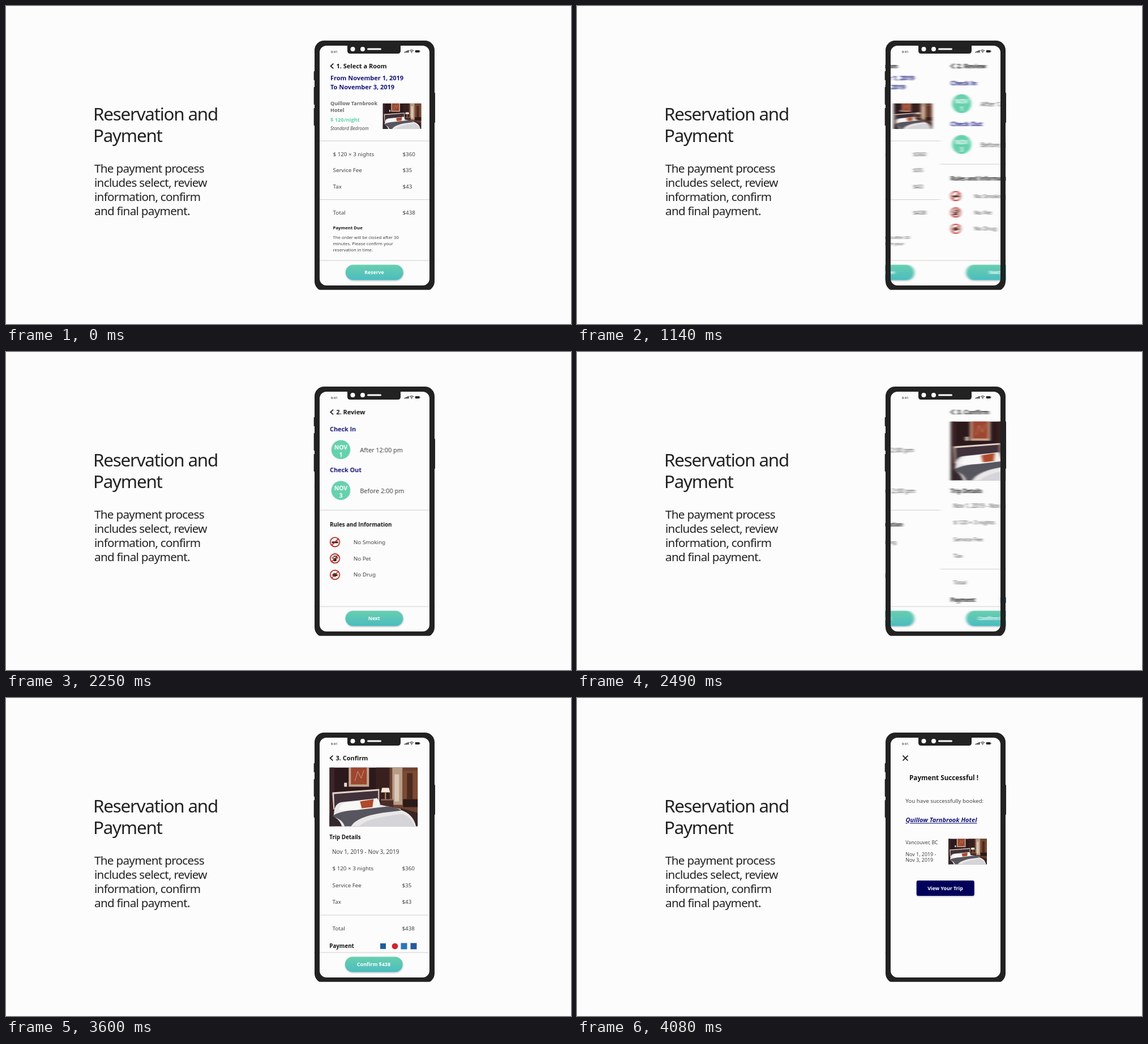
An HTML page for the animation above (5400 ms loop, 998x561 px).

```html
<!DOCTYPE html>
<html lang="en">
<head>
<meta charset="utf-8">
<title>Reservation and Payment</title>
<style>
  html, body { margin: 0; width: 100%; height: 100%; overflow: hidden; background: #fcfcfc; }
  svg { display: block; width: 100%; height: 100%; }
  text { font-family: "Noto Sans", "Open Sans", sans-serif; fill: #444; white-space: pre; }
  .b { font-family: "Open Sans", "Noto Sans", sans-serif; font-weight: 700; }
  .i { font-family: "Open Sans", "Noto Sans", sans-serif; font-style: italic; }
  .dark { fill: #151515; }
  .navy { fill: #14147a; }
  .grey { fill: #666; }
  .mint { fill: #62d0ab; }
  .white { fill: #fff; }
  .title { fill: #222; letter-spacing: -.04em; }
  .intro { fill: #222; letter-spacing: -.035em; }
  .mid { text-anchor: middle; }
  .link { text-decoration: underline; }
  .rule { stroke: #cdcdcd; stroke-width: 1.2; }
  .stroke { fill: none; stroke: #151515; stroke-width: 1.7; }
</style>
</head>
<body>
<svg id="stage" viewBox="0 0 998 561" xmlns="http://www.w3.org/2000/svg"></svg>
<script>
const LOOP = 5400, STEP = 30, SLIDE = 470, PITCH = 194, SHUTTER = 15;
const slideStarts = [890, 2240, 3580];

// y is the middle of the capitals
const text = (x, y, size, str, cls = '') =>
  `<text x="${x}" y="${y + size * .357}" font-size="${size}" class="${cls}">${str}</text>`;
const lines = (x, y, gap, size, rows, cls) =>
  rows.map((row, i) => text(x, y + i * gap, size, row, cls)).join('');
const rect = (x, y, w, h, fill, rx = 0, extra = '') =>
  `<rect x="${x}" y="${y}" width="${w}" height="${h}" rx="${rx}" fill="${fill}" ${extra}/>`;
const circle = (x, y, r, fill) => `<circle cx="${x}" cy="${y}" r="${r}" fill="${fill}"/>`;
const path = (d, fill, extra = '') => `<path d="${d}" fill="${fill}" ${extra}/>`;
const rule = y => `<path class="rule" d="M554 ${y}h194"/>`;
const photo = (x, y, w, h) =>
  `<use href="#bedroom" x="${x}" y="${y}" width="${w}" height="${h}"/>`;
const price = (y, label, amount) => text(577.5, y, 9.8, label) + text(700.5, y, 9.8, amount);
const header = label =>
  '<path class="stroke" d="M578.3 101.7l-4.8 4.3 4.8 4.3"/>' + text(583.5, 106, 11, label, 'b dark');
const button = (y, label, size, fill, rx) =>
  rect(599.7, y, 102, 27, fill, rx, 'filter="url(#shadow)"') +
  text(650.5, y + 13.5, size, label, 'b white mid');
const footer = (label, size) => rule(449) + button(456.5, label, size, 'url(#teal)', 13.5);

const dateBadge = (y, day) => circle(591.7, y, 16.8, '#66d1ad') +
  text(591.7, y - 4.2, 10.4, 'NOV', 'b white mid') + text(591.7, y + 8.7, 10.4, day, 'b white mid');

const ban = (y, label, glyph) => `<g transform="translate(581.3 ${y})">${glyph}
  <circle r="8.2" fill="none" stroke="#b9261d" stroke-width="1.8"/>
  <path d="M-5.8 5.8L5.8-5.8" stroke="#b9261d" stroke-width="1.6"/></g>` + text(614, y, 9.8, label);

const cigarette = rect(-5.5, -1, 11, 3, '#2a2020') + path('M2-2q3 0 3-3', 'none', 'stroke="#2a2020"');
const paw = [[-3.6, -1], [-1.4, -4], [1.6, -4], [3.8, -1]]
  .map(([x, y]) => circle(x, y, 1.3, '#2a2020')).join('') + circle(0, 2.2, 2.9, '#2a2020');
const leaf = [-70, -35, 0, 35, 70].map(angle =>
  `<ellipse cy="-2" rx="1.2" ry="3.6" fill="#2a2020" transform="translate(0 2) rotate(${angle})"/>`).join('');

const screens = [
  header('1. Select a Room') +
  lines(573, 127.5, 15.5, 11, ['From November 1, 2019', 'To November 3, 2019'], 'b navy') +
  lines(573, 172, 12.2, 9, ['Quillow Tarnbrook', 'Hotel'], 'b grey') +
  text(573, 201, 9.3, '$ 120/night', 'b mint') +
  text(573, 216.3, 8.1, 'Standard Bedroom', 'i') +
  photo(665.5, 171.7, 68, 45.3) + rule(238) +
  price(261.5, '$ 120 × 3 nights', '$360') + price(290, 'Service Fee', '$35') + price(318.6, 'Tax', '$43') +
  rule(341.5) + price(364.6, 'Total', '$438') +
  text(577.5, 391.5, 7.8, 'Payment Due', 'b dark') +
  lines(577.5, 408, 11, 7.75, ['The order will be closed after 30', 'minutes. Please confirm your', 'reservation in time.']) +
  footer('Reserve', 8.7),

  header('2. Review') +
  text(572.3, 136.3, 10.8, 'Check In', 'b navy') + dateBadge(172.3, '1') + text(625.5, 172.7, 10.9, 'After 12:00 pm') +
  text(572.3, 208.5, 10.8, 'Check Out', 'b navy') + dateBadge(244.2, '3') + text(625.5, 244.8, 10.9, 'Before 2:00 pm') +
  rule(279) + text(572.3, 304.3, 9.8, 'Rules and Information', 'b dark') +
  ban(335.3, 'No Smoking', cigarette) + ban(364.2, 'No Pet', paw) + ban(393, 'No Drug', leaf) +
  footer('Next', 8.7),

  header('3. Confirm') + photo(572.3, 122.5, 156, 104) +
  text(572.3, 245.7, 9.8, 'Trip Details', 'b dark') + text(577, 271.3, 10, 'Nov 1, 2019 - Nov 3, 2019') +
  price(301, '$ 120 × 3 nights', '$360') + price(330.5, 'Service Fee', '$35') + price(360, 'Tax', '$43') +
  rule(383) + price(406.5, 'Total', '$438') +
  text(572.3, 437.7, 9.75, 'Payment', 'b dark') +
  rect(662, 432.8, 10, 10, '#1f5c9e') + circle(688, 437.8, 5.4, '#d5232b') +
  rect(698.5, 432.3, 11, 11, '#2a77b8') + rect(715.5, 432.3, 11, 11, '#275a9c') +
  footer('Confirm $438', 9),

  '<path class="stroke" d="M575.5 101.7l9 8.8m0-8.8l-9 8.8"/>' +
  text(587, 141, 11.7, 'Payment Successful !', 'b dark') +
  text(580.3, 181.5, 9.75, 'You have successfully booked:') +
  text(580.5, 215.5, 11, 'Quillow Tarnbrook Hotel', 'b i navy link') +
  text(580.3, 255, 8.7, 'Vancouver, BC') +
  lines(580.3, 275.7, 10.5, 8.9, ['Nov 1, 2019 -', 'Nov 3, 2019']) +
  photo(656, 248.3, 68, 45.3) + button(322, 'View Your Trip', 8.8, '#05055a', 3)
];

const bedroom = `<symbol id="bedroom" viewBox="0 0 156 104" preserveAspectRatio="none">` +
  rect(0, 0, 156, 104, '#2c191c') +
  rect(0, 0, 9, 104, '#3b2528') + rect(82, 0, 24, 60, '#38201f') +
  rect(34, 0, 36, 34, '#c5a48e') + rect(38, 0, 28, 30, '#9d4630') +
  path('M45 24l5-17 6 12 5-14', 'none', 'stroke="#d29b80" stroke-width="1"') +
  rect(106, 0, 50, 80, '#6b4030') + rect(111, 0, 18, 66, '#b79c87') + rect(115, 12, 8, 48, '#d9c7b3') +
  rect(129, 6, 27, 64, '#7b4a32') + rect(137, 10, 10, 46, '#4c2a20') + rect(130, 56, 26, 14, '#2a1b1a') +
  path('M5 44L88 38V74H7Z', '#e2d3c6') + path('M8 47L86 41V76H9Z', '#40313a') +
  rect(26, 27, 5, 7, '#e8ddd0') + path('M93 36h12l2 8H91Z', '#f5ead8') + rect(98, 44, 2, 14, '#b3937b') +
  rect(91, 57, 22, 22, '#4a2c25') + rect(91, 56, 22, 2, '#957463') +
  path('M8 80Q9 62 24 61L80 55Q89 56 90 66L124 73Q148 78 154 104H4Z', '#e9e7e8') +
  path('M17 75Q20 60 35 61L56 59 58 73Q36 79 17 75Z', '#faf8f6') +
  path('M56 60L84 54Q90 61 87 69L59 73Z', '#f6f2ef') +
  path('M54 60L78 56 76 70 57 72Z', '#b04a2a') +
  path('M4 86Q20 76 50 75L101 69Q119 70 127 76L94 80Q48 87 38 104H27Q23 91 4 86Z', '#57555d') +
  path('M52 104Q68 88 130 82Q145 88 151 104Z', '#d5d4d9') +
  path('M0 84Q17 88 22 104H0Z', '#34282c') + path('M126 72L156 80V104H153Q148 82 126 75Z', '#3a2522') +
  '</symbol>';

const phone = '<g clip-path="url(#phoneClip)">' +
  path('M562 61H740A17 17 0 0 1 757 78V486A17 17 0 0 1 740 503H562A17 17 0 0 1 545 486V78A17 17 0 0 1 562 61Z' +
       'M566 70A12 12 0 0 0 554 82V481A12 12 0 0 0 566 493H736A12 12 0 0 0 748 481V82A12 12 0 0 0 736 70Z',
       '#222', 'fill-rule="evenodd"') + '</g>' +
  [[543.7, 115, 16], [543.7, 143, 31], [543.7, 180, 31], [755.7, 153, 53]]
    .map(([x, y, h]) => rect(x, y, 2.3, h, '#222', 1)).join('') +
  path('M603 69H697V79Q697 84 692 84H608Q603 84 603 79Z', '#222') +
  circle(612.5, 76, 4, '#fff') + circle(630, 76, 4, '#fff') + rect(638, 74.5, 25, 3, '#fff', 1.5) +
  text(573.7, 80.6, 6, '9:41', 'dark') +
  [0, 1, 2, 3].map(i => rect(703.5 + i * 2.1, 80.8 - i, 1.6, 1.4 + i, '#222')).join('') +
  path('M713 79q3.5-3 7 0M714.6 80.6q1.9-1.7 3.8 0', 'none', 'stroke="#222" stroke-width="1.1"') +
  circle(716.5, 82, .8, '#222') + rect(722.7, 78, 7.8, 4, '#222', 1) + rect(730.8, 79.2, .8, 1.6, '#222');

const stage = document.getElementById('stage');
stage.innerHTML = `<defs>
  <linearGradient id="teal" x2="0" y2="1"><stop stop-color="#69cfae"/><stop offset="1" stop-color="#4bbcc0"/></linearGradient>
  <filter id="shadow" x="-10%" y="-20%" width="120%" height="150%">
    <feDropShadow dx=".5" dy="1.3" stdDeviation="1" flood-opacity=".25"/></filter>
  <filter id="motion" filterUnits="userSpaceOnUse" x="540" y="95" width="800" height="400"
    color-interpolation-filters="sRGB"><feGaussianBlur id="blur"/></filter>
  <clipPath id="screenClip"><rect x="544" y="95" width="214" height="398"/></clipPath>
  <clipPath id="phoneClip"><rect x="540" y="55" width="222" height="445.7"/></clipPath>
  ${bedroom}</defs>` +
  lines(154, 191, 38, 31.4, ['Reservation and', 'Payment'], 'title') +
  lines(156, 287, 25, 20.7, ['The payment process', 'includes select, review', 'information, confirm', 'and final payment.'], 'intro') +
  `<g clip-path="url(#screenClip)"><g id="track">` +
  screens.map((screen, i) => `<g transform="translate(${i * PITCH})">${screen}</g>`).join('') +
  '</g></g>' + phone;

const track = document.getElementById('track');
const blur = document.getElementById('blur');

function draw(now) {
  const time = Math.floor(now % LOOP / STEP) * STEP;
  let shift = 0, speed = 0;
  for (const start of slideStarts) {
    const p = Math.min(1, Math.max(0, (time - start) / SLIDE));
    shift += PITCH * p * p * (3 - 2 * p);
    speed += PITCH * 6 * p * (1 - p) / SLIDE;
  }
  track.setAttribute('transform', `translate(${-shift})`);
  // A box of the shutter's length has this standard deviation
  blur.setAttribute('stdDeviation', `${speed * SHUTTER / Math.sqrt(12)} 0`);
  if (speed > 0) track.setAttribute('filter', 'url(#motion)');
  else track.removeAttribute('filter');
}

const began = performance.now();
function tick() {
  draw(performance.now() - began);
  requestAnimationFrame(tick);
}
tick();
</script>
</body>
</html>
```
